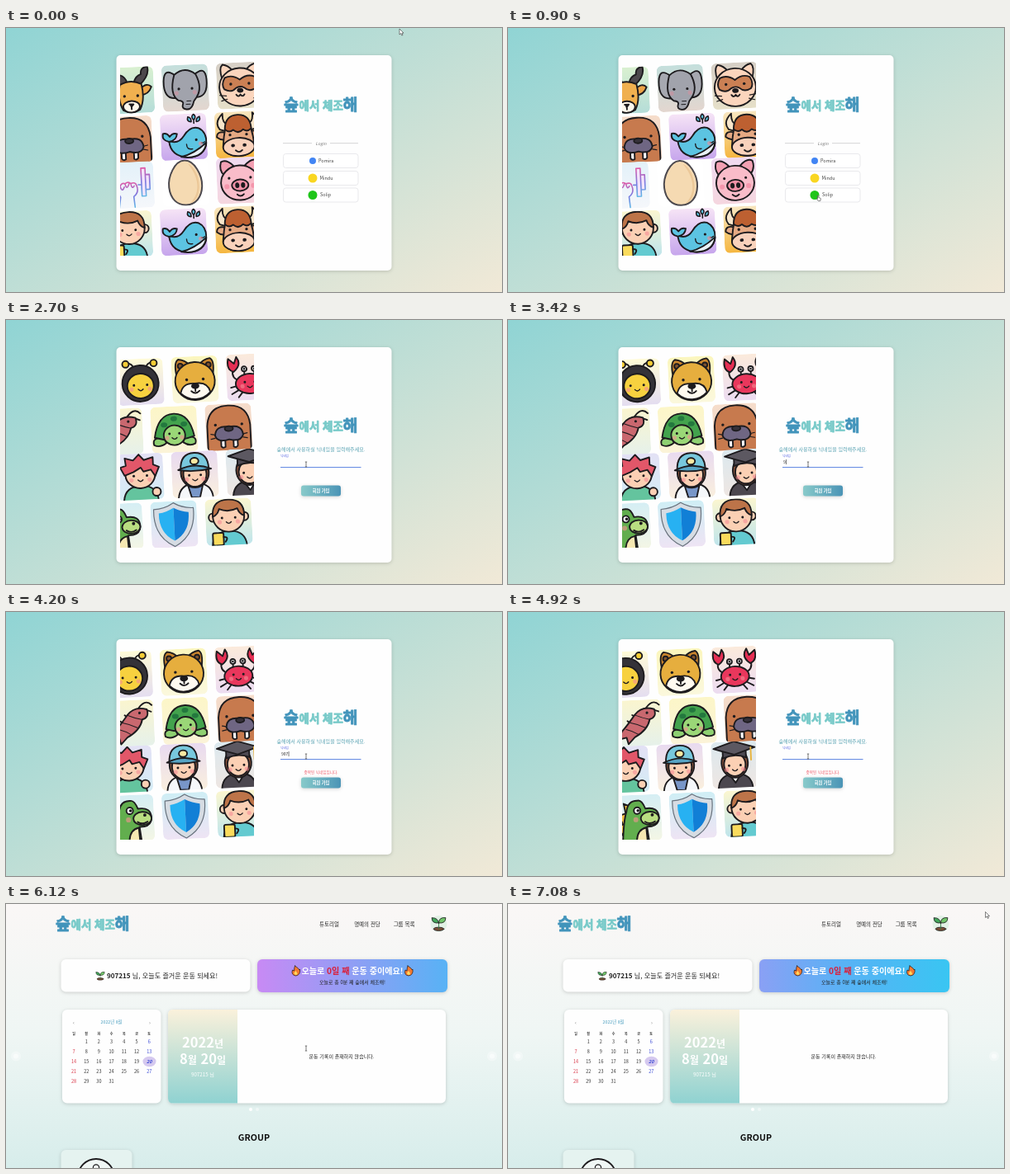
An HTML page for the animation above (7140 ms loop, 600 by 320 pixels).

```html
<!DOCTYPE html>
<html lang="ko">
<head>
<meta charset="utf-8">
<style>
html,body{margin:0;width:100%;height:100%;overflow:hidden}
svg{display:block;width:600px;height:320px;font-family:"Noto Sans CJK KR","Noto Sans CJK",sans-serif}
.card{filter:drop-shadow(0 1px 2px #0000002b)}
.ink{stroke:#1d1b1e;stroke-width:1.9;stroke-linejoin:round;stroke-linecap:round}
.dot{stroke:none}
</style>
</head>
<body>
<svg id="stage" viewBox="0 0 600 320" xmlns="http://www.w3.org/2000/svg"></svg>
<script>
const LOOP = 7140, JOIN_AT = 2130, HOME_AT = 5880, SPEED = 9.1;
const USER = '907215';
const INK = '#1d1b1e', SKIN = '#fbd0b4', TEAL = '#78cac9', BLUE = '#4294bb';

// shape helpers
const e = (x, y, rx, fill, ry = rx, extra = '') => `<ellipse cx="${x}" cy="${y}" rx="${rx}" ry="${ry}" fill="${fill}" ${extra}/>`;
const p = (d, fill = 'none', extra = '') => `<path d="${d}" fill="${fill}" ${extra}/>`;
const r = (x, y, w, h, rx, fill, extra = '') => `<rect x="${x}" y="${y}" width="${w}" height="${h}" rx="${rx}" fill="${fill}" ${extra}/>`;
const text = (x, y, size, str, fill = '#222', extra = '') =>
  `<text x="${x}" y="${y + size * .36}" font-size="${size}" fill="${fill}" text-anchor="middle" ${extra}>${str}</text>`;
const dot = (x, y, s, fill = INK) => e(x, y, s, fill, s, 'class="dot"');
const both = f => f(-1) + f(1);
const gradient = (id, pos, ...stops) => `<linearGradient id="${id}" ${pos}>` +
  stops.map((c, i) => `<stop offset="${i / (stops.length - 1)}" stop-color="${c}"/>`).join('') + '</linearGradient>';
const face = (y, gap, smile = 5) => both(s => dot(s * gap, y, 1.5) + dot(s * (gap + 3), y + 5, 2.6, '#f58d9599')) +
  p(`M-3,${y + smile}q3,3.5 6,0`, 'none', 'stroke-width="1.4"');

const WALRUS = p('M-26,30V-2Q-24,-26 0,-26Q24,-26 26,-2V30Z', '#c77a4e') +
  both(s => dot(s * 16, -3, 1.7) + p(`M${s * 5},15v9q${s * 3},2 ${s * 5},-1V13Z`, '#fff') +
    p(`M${s * 17},9l${s * 5},-1M${s * 17},13l${s * 5},1`, 'none', 'stroke-width="1.2"')) +
  p('M0,0Q16,-3 17,10Q14,19 0,15Q-14,19 -17,10Q-16,-3 0,0Z', '#6f6683') + e(0, 2, 5, '#353139', 3);
const BODY = c => p('M-21,30Q-20,11 0,11Q20,11 21,30Z', c);

// name: [tile colours, drawing] in a 56 px square around the middle
const icons = {
  goat: ['#d9f0d0', '#b5ddd8', both(s => p(`M${s * 4},-9Q${s * 6},-17 ${s * 13},-19Q${s * 12},-27 ${s * 21},-28Q${s * 24},-17 ${s * 11},-6Z`, '#4d484c') +
    p(`M${s * 11},-1Q${s * 20},-9 ${s * 25},-3Q${s * 21},7 ${s * 11},6Z`, '#eda447')) +
    p('M-13,-7Q0,-14 13,-7Q17,12 10,24Q0,30 -10,24Q-17,12 -13,-7Z', '#f0b04f') + e(0, 20, 10, '#fff8ec', 7) +
    both(s => dot(s * 8, 7, 1.7)) + p('M-2.5,17h5l-2.5,3v3', INK)],
  elephant: ['#c4dfdc', '#e3d6cf', both(s => p(`M${s * 11},-15Q${s * 25},-27 ${s * 26},-9Q${s * 27},12 ${s * 13},12Z`, '#a6a8b0')) +
    p('M-13,-16Q0,-27 13,-16Q21,1 13,12Q9,16 8,21Q5,27 0,26Q-6,25 -4,20Q-2,16 -9,15Q-20,7 -13,-16Z', '#a1a3ac') +
    both(s => dot(s * 8, 1, 1.6) + dot(s * 11, 6, 2.6, '#d98f9d88')) + p('M1,16h5M0,20h5', 'none', 'stroke-width="1"')],
  raccoon: ['#d6cfc6', '#e6e0c9', both(s => p(`M${s * 21},-8Q${s * 25},-22 ${s * 20},-26Q${s * 13},-25 ${s * 8},-18Z`, '#fbd5bd')) +
    e(0, 2, 25, '#fbd5bd', 23) + p('M0,-7Q9,-14 18,-10Q23,-2 19,4Q11,9 5,3Q0,0 -5,3Q-11,9 -19,4Q-23,-2 -18,-10Q-9,-14 0,-7Z', '#cb8054') +
    both(s => dot(s * 11, -2, 1.7) + p(`M${s * 17},12l${s * 8},-1M${s * 16},16l${s * 7},2`, 'none', 'stroke-width="1.2"')) + e(0, 6, 3, INK, 2) + p('M-5,11q2.5,4 5,0q2.5,4 5,0')],
  walrus: ['#f6ddcb', '#e9cfc0', WALRUS],
  whale: ['#f6e4f6', '#c6a5ec', p('M-18,4Q-7,9 0,-1Q8,-13 18,-10Q28,-5 27,9Q24,25 4,25Q-17,23 -18,4Z', '#5cc4e2') +
    p('M-4,24Q12,21 27,8Q24,25 4,25Z', '#e8f1f6') + p('M-18,5Q-27,3 -25,-5Q-20,-6 -17,-1Q-13,-6 -8,-4Q-9,4 -18,5Z', '#5cc4e2') +
    p('M3,9q0,7 7,6M21,8q2,1 4,-1', 'none', 'stroke-width="1.4"') + dot(15, 4, 1.6) + dot(20, 9, 2.6, '#f58d9599') +
    p('M13,-16V-20M13,-20Q9,-24 13,-27Q17,-24 13,-20M10,-18Q4,-18 6,-24Q10,-23 10,-18M16,-18Q22,-18 20,-24Q16,-23 16,-18', '#5cc4e2', 'stroke-width="1.6"')],
  bull: ['#f8e6c0', '#f5b63f', both(s => p(`M${s * 12},-13Q${s * 19},-14 ${s * 18},-26Q${s * 29},-16 ${s * 22},-7L${s * 13},-4Z`, '#f8e6cb') +
    p(`M${s * 15},-3Q${s * 26},-6 ${s * 26},2Q${s * 20},7 ${s * 15},5Z`, '#e5a983')) +
    p('M-15,-10Q0,-22 15,-10Q18,2 19,14Q15,26 0,26Q-15,26 -19,14Q-18,2 -15,-10Z', '#e5a983') +
    p('M-16,-7Q-15,-24 0,-24Q15,-24 16,-7Q11,-2 6,-6Q0,0 -6,-6Q-11,-2 -16,-7Z', '#bd6031') + e(0, 15, 19, '#f9d2bc', 11) +
    both(s => dot(s * 10, 0, 1.7) + e(s * 7, 13, 1.4, INK, 1)) + p('M-4,19q4,4 8,0')],
  arm: ['#e3f1f9', '#f5f7fb', '<g style="stroke:url(#neon);stroke-width:1.6">' +
    p('M-15,27L-13,14Q-18,6 -13,1Q-11,-4 -7,-2Q-3,-5 0,-2Q6,-4 7,1Q10,9 3,14L4,27M-13,1q2,8 5,1M-7,-2q2,9 5,0M0,-2q1,8 4,3') +
    p('M-17,4h-7v-7h9ZM9,0h4v-20h5v34h-5v-14M18,-12h5v18h-5', '#f3e4fb') + '</g>'],
  egg: ['#fff', '#fff', '<g style="stroke:#4c494e;stroke-width:2">' + p('M0,-27C12,-27 21,-8 20,5C19,19 11,27 0,27C-11,27 -19,19 -20,5C-21,-8 -12,-27 0,-27Z', '#f5dab2') + '</g>' +
    p('M4,-23C16,-7 19,12 5,25C21,21 20,-14 4,-23Z', '#ecc898', 'class="dot"')],
  pig: ['#efdaf0', '#f5d6df', both(s => p(`M${s * 7},-18Q${s * 16},-27 ${s * 22},-23Q${s * 25},-14 ${s * 19},-7Z`, '#f3a0b3')) +
    e(0, 3, 23, '#f9bcc9', 21) + e(0, 6, 10, '#f091a7', 7) + both(s => e(s * 3.5, 6, 1.6, INK, 2.4) + dot(s * 13, -3, 1.6) + dot(s * 16, 7, 3, '#f27e9999')) + p('M-4,17q4,4 8,0')],
  monkey: ['#fbf6d0', '#bfe5ec', BODY('#63cad0') + both(s => e(s * 19, -6, 5, SKIN)) + e(0, -7, 19, SKIN, 19) +
    p('M-19,-7Q-20,-27 0,-27Q20,-27 19,-7Q13,-9 11,-16Q0,-11 -11,-16Q-13,-9 -19,-7Z', '#bd7449') + face(-5, 8) + r(-20, 13, 13, 15, 2, '#f9db5c') + p('M-7,18q7,0 2,6')],
  bee: ['#fffbd7', '#e4ddf0', both(s => p(`M${s * 7},-16Q${s * 9},-23 ${s * 15},-23`) + e(s * 17, -22, 4, '#f5cd35')) +
    e(0, 2, 22, '#343238', 22) + e(0, 5, 16, '#f7d13f', 15) + face(4, 8)],
  bear: ['#fbf6bd', '#fbf8dd', both(s => p(`M${s * 22},-5Q${s * 25},-22 ${s * 19},-25Q${s * 11},-24 ${s * 6},-18Z`, '#ca852d') + e(s * 17, -17, 3, '#81532d')) +
    e(0, 2, 24, '#e6ae3e', 23) + p('M-18,16Q-15,3 0,5Q15,3 18,16Q10,24 0,24Q-10,24 -18,16Z', '#fffaf0') +
    both(s => dot(s * 10, 0, 1.7)) + e(0, 8, 4, INK, 2.7) + p('M0,10v4m-5,0q5,5 10,0')],
  crab: ['#fbeadb', '#ecdcf1', both(s => p(`M${s * 12},4Q${s * 22},1 ${s * 20},-9M${s * 14},10l${s * 9},2M${s * 13},15l${s * 9},5M${s * 9},18l${s * 5},6`) +
    p(`M${s * 19},-7Q${s * 8},-15 ${s * 15},-25L${s * 18},-17L${s * 25},-23Q${s * 28},-10 ${s * 19},-7Z`, '#e52f54') + p(`M${s * 6},-3v-6`) + e(s * 6, -10, 3, '#fff') + dot(s * 6, -10, 1.3)) +
    e(0, 8, 17, '#e9375c', 12) + face(6, 6)],
  shrimp: ['#faf5cf', '#e6f1ea', p('M8,-15Q18,-30 26,-21M6,-12Q16,-18 25,-13M-5,10l-7,-2M-5,2l-8,-5M1,-5l-8,-5') +
    p('M20,-16Q5,-21 -4,-10Q-14,3 -20,9L-26,19L-15,17L-13,25L-5,17Q11,9 14,-4Q23,-6 20,-16Z', '#c9686f') +
    p('M-4,-10Q5,-6 13,-4M-10,-1Q-1,1 8,6M-15,7Q-7,9 0,14', 'none', 'stroke-width="1"') + dot(11, -12, 1.6)],
  turtle: ['#fcf6c8', '#fbf3d8', both(s => p(`M${s * 13},10Q${s * 28},8 ${s * 25},18Q${s * 18},22 ${s * 10},16Z`, '#8ed071')) +
    p('M-24,9Q-19,-19 0,-19Q19,-19 24,9Q0,17 -24,9Z', '#43a34d') + [[-12, -6], [0, -13], [12, -6]].map(([x, y]) => e(x, y, 4, '#23783e', 3, 'class="dot"')).join('') +
    e(0, 7, 13, '#9ad777', 12) + face(5, 6)],
  kid: ['#e3e1f5', '#d4ecf5', BODY('#64c49e') + e(0, -3, 18, SKIN, 17) +
    p('M-19,-2L-24,-12L-17,-14L-18,-23L-8,-20L-1,-27L5,-20L16,-23L16,-14L23,-11L18,0L13,-8L4,-6L1,-11L-8,-6Z', '#e25769') + face(-1, 8) + e(19, 19, 5, SKIN)],
  cap: ['#e8daf0', '#faefde', BODY('#f5f7fa') + p('M-9,13l4,15h10l4,-15Z', '#7896c8') + e(0, -2, 17, '#85513a', 18) + e(0, 0, 14, SKIN, 15) +
    p('M-17,-6Q-17,-26 0,-26Q17,-26 17,-6Q0,-12 -17,-6Z', '#78c8dd') + e(0, -16, 5, '#f8e9a2', 4) + p('M-20,-6Q0,-15 20,-6Q0,-2 -20,-6Z', '#57a4c4') + face(1, 7)],
  grad: ['#dce9ef', '#eee6e2', BODY('#4c474f') + p('M-7,12L0,22L7,12Z', '#fff') + e(0, -2, 16, '#875039', 18) + e(0, 0, 13, SKIN, 14) +
    p('M-14,-8v-12h28v12Q0,-14 -14,-8Z', '#4d4952') + p('M-25,-20L0,-28L25,-20L0,-12Z', '#5c5861') + p('M20,-20v15', 'none', 'stroke="#e9b43d"') + face(1, 7)],
  dino: ['#d5eef4', '#f4f6e5', p('M-20,20L-26,10L-19,7L-23,-4L-15,-6L-17,-18L-6,-13Z', '#f1bd45') +
    p('M-20,30Q-18,2 -14,-8Q-12,-22 0,-21Q5,-22 9,-11Q25,-13 25,1Q24,12 10,11L12,30Z', '#62ae4e') + e(14, 1, 11, '#b9dd81', 8) +
    p('M-3,30Q-3,14 9,12L10,30Z', '#f6e8b2') + e(-1, -9, 4, '#fff') + dot(0, -9, 1.8) + e(17, -3, 1, INK) + p('M8,5q6,4 12,0') + dot(-3, 2, 3, '#f5939399')],
  shield: ['#cfeef5', '#eee4f4', '<g style="stroke:#68727d;stroke-width:1.2">' + p('M0,-26Q11,-19 24,-19Q26,14 0,27Q-26,14 -24,-19Q-11,-19 0,-26Z', '#d6dce3') + '</g>' +
    p('M0,-20Q-9,-15 -18,-14Q-19,10 0,20Z', '#27b1f2', 'class="dot"') + p('M0,-20Q9,-15 18,-14Q19,10 0,20Z', '#117fd6', 'class="dot"')],
};

// rows drift in turn to the left and to the right
const walls = {
  login: { at: 0, x: [217, 215], rows: ['goat elephant raccoon', 'walrus whale bull', 'arm egg pig', 'monkey whale bull'] },
  join: { at: 3420, x: [222, 210], rows: ['bee bear crab', 'shrimp turtle walrus', 'kid cap grad', 'dino shield monkey'] },
};
const wall = id => '<g clip-path="url(#window)">' + walls[id].rows.map((row, i) => row.split(' ').map((name, j) =>
  `<g class="tile" data-wall="${id}" data-row="${i}" data-col="${j}"><g clip-path="url(#tile)" class="ink">` +
  r(-28, -28, 56, 56, 6, `url(#${name})`, 'class="dot"') + icons[name][2] + '</g></g>').join('')).join('') + '</g>';

const thick = c => `stroke="${c}" stroke-width=".8" stroke-linejoin="round"`;
const title = (x, y) => `<g transform="translate(${x} ${y})" font-weight="900">` + text(9, 0, 19.5, '숲', BLUE, thick(BLUE)) +
  text(31, 1, 13.5, '에서', TEAL, thick(TEAL)) + text(59.5, 1, 13.5, '체조', TEAL, thick(TEAL)) + text(80.5, 0, 19.5, '해', BLUE, thick(BLUE)) + '</g>';
const frame = r(0, 0, 600, 320, 0, 'url(#sea)') + r(133.5, 33, 333, 261, 5, '#fefefe', 'class="card"');
const sprout = (x, y, k) => `<g transform="translate(${x} ${y}) scale(${k})" class="ink" style="stroke-width:.8">` +
  e(0, 6, 6, '#7b5138', 2) + p('M0,6V-1', 'none', 'stroke="#347b45"') +
  p('M0,-1Q-8,0 -8,-7Q-1,-7 0,-1Z', '#43a85a') + p('M0,-1Q0,-8 8,-7Q8,0 0,-1Z', '#72c66b') + '</g>';
const fire = x => `<g transform="translate(${x} 81)" class="ink" style="stroke-width:.7">` +
  p('M-1,-6Q5,-2 4,-1L5,-2Q6,5 0,6Q-6,5 -4,-1L-2,0Q-2,-3 -1,-6Z', '#f47b31') + p('M0,0Q4,5 0,5Q-4,4 0,0Z', '#ffd85b', 'class="dot"') + '</g>';

const provider = (y, name, color, size, x) => r(335.5, y - 8.5, 90.5, 17, 3, '#fff', 'stroke="#e4e4e8" stroke-width=".8"') +
  e(371, y, size, color) + text(x, y, 5.5, name, '#444', 'style="text-anchor:start"');
const login = frame + wall('login') + title(336, 93) +
  p('M335,139.7h35M392,139.7h34', 'none', 'stroke="#c9c9cc" stroke-width=".8"') + text(381, 140, 5, 'Login', '#777', 'font-style="italic"') +
  provider(161, 'Pomira', '#4285f4', 4, 378) + provider(182, 'Mindu', '#f9d621', 5.5, 379.5) + provider(202.5, 'Solip', '#1fc51a', 5.5, 380);

const join = frame + wall('join') + title(336, 128) +
  text(381, 156.5, 6.05, '숲해에서 사용하실 닉네임을 입력해주세요.', '#5ba4b4', 'font-weight="500"') +
  text(332, 164.5, 3.6, '닉네임', '#3d4fe0', 'style="text-anchor:start"') +
  p('M332,178.6h97.5', 'none', 'stroke="#5b83e0"') +
  text(333, 172.3, 5, '', '#333', 'id="typed" style="text-anchor:start"') + r(0, 169, .6, 6, 0, '#222', 'id="caret"') +
  text(381, 194.7, 4.65, '중복된 닉네임입니다.', '#ee5a68', 'id="error"') +
  r(357, 200.5, 48, 13, 3, 'url(#button)', 'class="card"') + text(381, 207, 5.2, '회원 가입', '#fff', 'font-weight="700"');

const dayX = i => 82 + i * 15.2;
const dayColor = i => i == 0 ? '#d93445' : i == 6 ? '#3949d6' : '#333';
const days = [...Array(31).keys()].map(i => {
  const col = (i + 1) % 7, row = Math.floor((i + 1) / 7);
  return text(dayX(col), 167 + row * 12, 5.5, i + 1, dayColor(col), i == 19 ? 'font-weight="700" font-style="italic"' : '');
}).join('');
const unit = s => `<tspan font-size="12">${s}</tspan>`;
const home = r(0, 0, 600, 320, 0, 'url(#mist)') + title(60, 24) +
  [[391, '튜토리얼'], [437, '명예의 전당'], [481.5, '그룹 목록']].map(([x, s]) => text(x, 24.5, 6.5, s, '#222', 'font-weight="500"')).join('') +
  e(523.5, 24, 10, '#e2f1e5') + sprout(523.5, 24, 1.05) +
  r(66.5, 67, 229, 39.5, 6, '#fefefe', 'class="card"') + sprout(114, 87, .65) +
  text(189, 87, 8.1, `<tspan font-weight="700">${USER}</tspan> 님, 오늘도 즐거운 운동 되세요!`) +
  r(304, 67, 230, 40, 6, 'url(#banner)', 'class="card"') + fire(350.5) + fire(487) +
  text(419, 81.5, 10.1, '오늘로 <tspan fill="#d8203c">0일 째</tspan> 운동 중이에요!', '#fff', 'font-weight="700"') +
  text(419, 94.5, 6, '오늘로 총 0분 째 숲에서 체조해!') +
  r(68, 128, 119.5, 113.5, 6, '#fefefe', 'class="card"') + text(127.5, 143.5, 5.3, '2022년 8월', '#4b9fc0') +
  text(82, 143.5, 6, '‹', '#777') + text(174, 143.5, 6, '›', '#777') +
  [...'일월화수목금토'].map((s, i) => text(dayX(i), 158, 4, s, '#333', 'font-weight="700"')).join('') +
  e(173.5, 191, 8, '#d5c9ef', 6.2) + days +
  r(196, 128, 336, 113.5, 6, '#fefefe', 'class="card"') + p('M280,128H202Q196,128 196,134V235.5Q196,241.5 202,241.5H280Z', 'url(#date)') +
  text(238, 168, 16.5, '2022' + unit('년'), '#fff', 'font-weight="700"') +
  text(238, 188, 16.5, `8${unit('월')} 20${unit('일')}`, '#fff', 'font-weight="700"') + text(238, 207, 6.2, USER + ' 님', '#fff') +
  text(406, 185, 6.05, '운동 기록이 존재하지 않습니다.') +
  [12, 588].map(x => e(x, 184.5, 6, '#ffffff55') + e(x, 184.5, 3, '#ffffff88')).join('') + e(296, 249, 2, '#fff') + e(304, 249, 2, '#ffffff77') +
  text(300, 283, 10.7, 'GROUP', '#111', 'font-weight="700"') +
  r(66.5, 298, 86, 50, 6, '#e5f3f0', 'class="card"') + e(109, 331, 22, '#f0f7f5', 22, 'class="ink"') + e(109, 319.5, 3.6, 'none', 3.6, 'class="ink" style="stroke-width:1.2"');

const down = 'x1="0" y1="0" x2="0" y2="1"';
const stage = document.getElementById('stage');
stage.innerHTML = '<defs>' + Object.entries(icons).map(([id, [a, b]]) => gradient(id, down, a, b)).join('') +
  gradient('sea', 'gradientUnits="userSpaceOnUse" x1="156" y1="-90" x2="444" y2="410"', '#90d4d4', '#f1e9d7') +
  gradient('mist', down, '#faf7f6', '#eff6f4', '#d7edeb') + gradient('date', down, '#faf1db', '#c5e1d6', '#8fd2d1') +
  gradient('button', '', '#88caca', '#4b94b6') + gradient('neon', down, '#dd5ca9', '#7d78df', '#62b7e6') +
  gradient('banner', 'gradientUnits="userSpaceOnUse"', '#c88af4', '#58b2f5', '#20d5f0') +
  `<clipPath id="window">${r(138, 40, 162, 236, 0, '#000')}</clipPath><clipPath id="tile">${r(-28, -28, 56, 56, 6, '#000')}</clipPath></defs>` +
  `<g id="login">${login}</g><g id="join">${join}</g><g id="home">${home}</g><g id="cursor">` +
  p('M0,0V7L1.7,5.5L2.8,8L4,7.5L2.9,5.1H5Z', '#fff', 'stroke="#333" stroke-width=".6"') +
  p('M0,0Q.8,-1 1.3,0V2.5L3.2,3Q4,3.4 3.7,5L3.2,6.6H.8L-1,4Q-1,3.4 0,3.8Z', '#fff', 'stroke="#333" stroke-width=".6"') +
  p('M-1.2,-3H1.2M0,-3V3M-1.2,3H1.2', 'none', 'stroke="#444" stroke-width=".7"') + '</g>';

const $ = id => document.getElementById(id);
const show = (el, on) => el.style.display = on ? '' : 'none';
const tiles = [...document.querySelectorAll('.tile')], pointers = [...$('cursor').children], banner = $('banner');

// time, x, y
const mouse = [[0, 476, 1], [120, 476, 1], [740, 374.5, 203], [2200, 374.5, 204], [2700, 363, 175], [6520, 363, 175], [6960, 577.5, 9.5], [LOOP, 577.5, 9.5]];
function mouseAt(t) {
  const i = mouse.findIndex(k => k[0] > t), [t0, x0, y0] = mouse[i - 1], [t1, x1, y1] = mouse[i];
  const u = (t - t0) / (t1 - t0), s = u * u * (3 - 2 * u);
  return [x0 + (x1 - x0) * s, y0 + (y1 - y0) * s];
}

function typedAt(t) {
  const count = (start, step, max) => Math.max(0, Math.min(max, Math.floor((t - start) / step) + 1));
  return t < 4500 ? USER.slice(0, count(3360, 180, 3)) : t < 5100 ? USER.slice(0, 3 - count(4560, 90, 3)) : USER.slice(0, count(5100, 100, 6));
}

function draw(now) {
  const t = now % LOOP;
  show($('login'), t < JOIN_AT);
  show($('join'), t >= JOIN_AT && t < HOME_AT);
  show($('home'), t >= HOME_AT);
  for (const tile of tiles) {
    const { wall, row, col } = tile.dataset, { at, x: start } = walls[wall], odd = row % 2;
    const x = start[odd] + (col - 1) * 66 + (odd ? 1 : -1) * SPEED * (t - at) / 1000;
    const y = 72.5 + row * 57.5 + odd * 2 - (x - 217) * .045;
    tile.setAttribute('transform', `translate(${x} ${y}) rotate(-2.8)`);
  }
  const typed = typedAt(t);
  $('typed').textContent = typed;
  $('caret').setAttribute('x', 333.4 + typed.length * 2.78);
  show($('caret'), t > 2820 && (t < 4860 || t > 5080));
  show($('error'), t > 4080 && t < 5100);
  const shift = 304 - 127 * (t - 6120) / 960;
  banner.setAttribute('x1', shift);
  banner.setAttribute('x2', shift + 460);
  $('cursor').setAttribute('transform', `translate(${mouseAt(t)})`);
  const kind = t > 640 && t < JOIN_AT ? 1 : t > 2600 && t < 6540 ? 2 : 0;
  pointers.forEach((el, i) => show(el, i == kind));
  requestAnimationFrame(draw);
}
draw(0);
</script>
</body>
</html>
```
